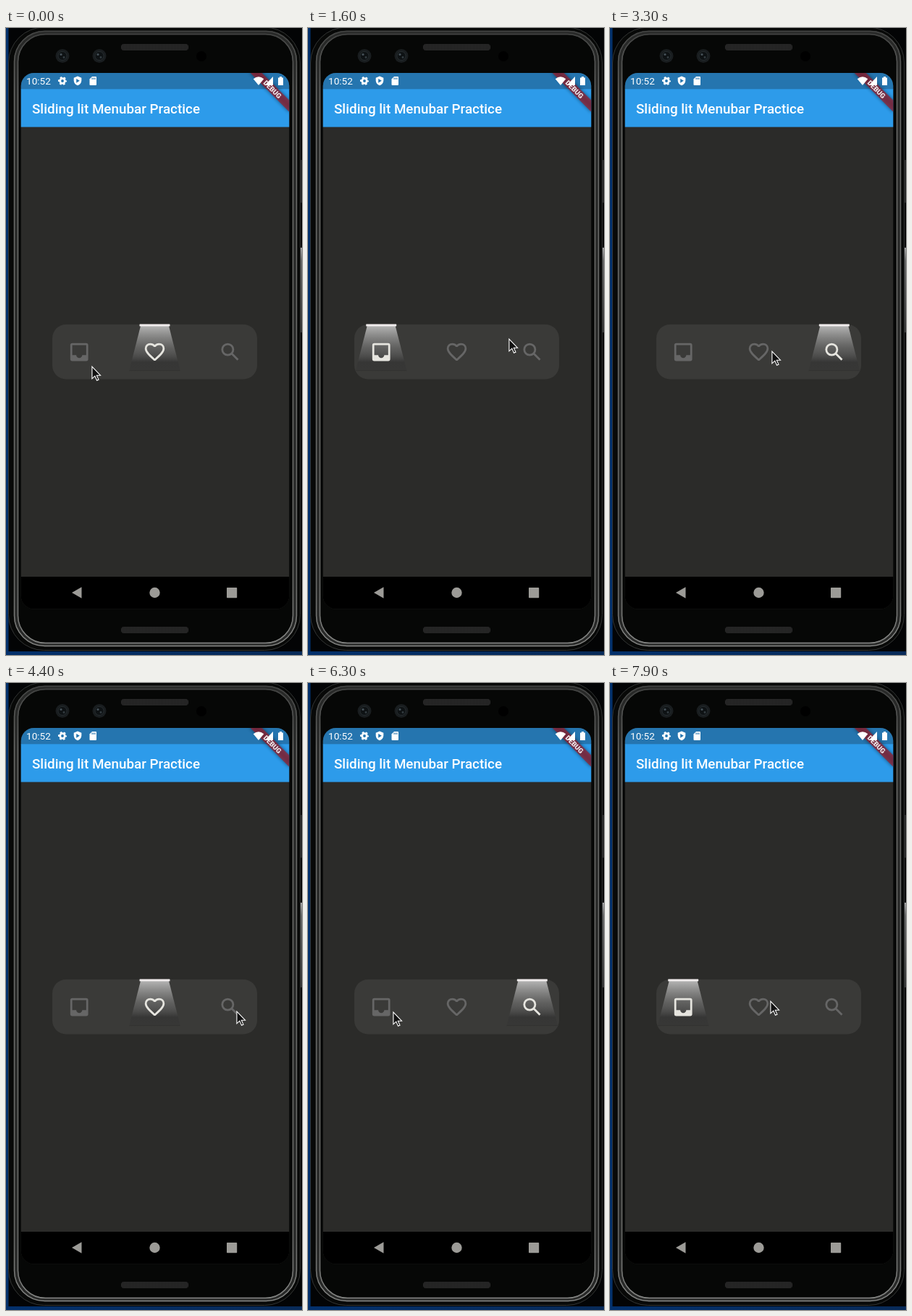
Write an HTML page that moves like this. It is 409 by 865 pixels and loops after 8000 ms.

```html
<!DOCTYPE html>
<html lang="en">
<head>
<meta charset="utf-8">
<title>Spotlight menu</title>
<style>
html, body { margin: 0; width: 100%; height: 100%; overflow: hidden; background: #032f6b; }
svg { display: block; width: 409px; height: 865px; }
text { font-family: Roboto, "Open Sans", sans-serif; fill: #fff; }
</style>
</head>
<body>
<svg viewBox="0 0 409 865">
  <defs>
    <linearGradient id="desk" x1="0" y1="0" x2="1" y2="0">
      <stop offset="0" stop-color="#03306b"/>
      <stop offset="1" stop-color="#082a58"/>
    </linearGradient>
    <linearGradient id="ring" x1="0" y1="0" x2="0" y2="1">
      <stop offset="0" stop-color="#434443"/>
      <stop offset=".1" stop-color="#6c6d6b"/>
      <stop offset=".9" stop-color="#6c6d6b"/>
      <stop offset="1" stop-color="#838482"/>
    </linearGradient>
    <linearGradient id="key" x1="0" y1="0" x2="0" y2="1">
      <stop offset="0" stop-color="#a2a3a3"/>
      <stop offset=".15" stop-color="#636464"/>
      <stop offset="1" stop-color="#333434"/>
    </linearGradient>
    <linearGradient id="glow" x1="0" y1="0" x2="0" y2="1">
      <stop offset="0" stop-color="#fff" stop-opacity=".62"/>
      <stop offset=".5" stop-color="#909090" stop-opacity=".42"/>
      <stop offset=".8" stop-color="#333" stop-opacity=".6"/>
      <stop offset="1" stop-color="#353534" stop-opacity=".5"/>
    </linearGradient>
    <pattern id="mesh" width="2" height="4" patternUnits="userSpaceOnUse">
      <rect width="2" height="4" fill="#2d2d2d"/>
      <rect width="1" height="4" fill="#1c1c1c"/>
    </pattern>
    <clipPath id="screen"><rect x="20.700" y="62" width="370.600" height="739.500" rx="18"/></clipPath>
    <filter id="blur" x="-20%" y="-80%" width="140%" height="260%"><feGaussianBlur stdDeviation="2.5"/></filter>
  </defs>

  <rect width="409" height="865" fill="url(#desk)"/>
  <rect x="3.500" width="405.500" height="860" fill="#030405"/>

  <!-- phone body -->
  <rect x="405.500" y="182" width="5" height="59" rx="2" fill="#252626"/>
  <rect x="405.500" y="303" width="5" height="117" rx="2" fill="url(#key)"/>
  <rect x="3.500" y="-1" width="403" height="859.500" rx="49" fill="#080908" stroke="#333534"/>
  <rect x="14" y="6.500" width="385" height="844" rx="40" fill="#060706" stroke="#282928" stroke-width="6"/>
  <rect x="11.500" y="4.500" width="390" height="848" rx="42" fill="none" stroke="url(#ring)" stroke-width="1.500"/>
  <rect x="16.500" y="8.500" width="380" height="840" rx="38" fill="none" stroke="url(#ring)" stroke-width="1.500"/>
  <rect x="159" y="22" width="93" height="9" rx="4" fill="url(#mesh)"/>
  <rect x="159" y="826" width="93" height="9" rx="4" fill="url(#mesh)"/>
  <g id="lenses"></g>
  <circle cx="270" cy="39" r="7" fill="#000"/>

  <g clip-path="url(#screen)">
    <rect x="20" y="62" width="372" height="740" fill="#2b2b29"/>
    <rect x="20" y="84" width="372" height="52.600" fill="#2d9bea"/>
    <rect x="20" y="62" width="372" height="22.300" fill="#2575af"/>
    <text x="28" y="78" font-size="13.600">10:52</text>
    <text x="36" y="118" font-size="18.840" font-weight="500">Sliding lit Menubar Practice</text>

    <!-- corner ribbon -->
    <g transform="translate(391 62) rotate(45)">
      <rect x="-38" y="26.400" width="76" height="11.300" fill="#000" opacity=".5" filter="url(#blur)"/>
      <rect x="-38" y="26.400" width="76" height="11.300" fill="#981f30" opacity=".72"/>
      <text y="35.500" font-size="9.600" font-weight="900" text-anchor="middle" opacity=".9">DEBUG</text>
    </g>

    <!-- status icons -->
    <g fill="#fff">
      <circle cx="78" cy="73" r="3.300" fill="none" stroke="#fff" stroke-width="2.800"/>
      <circle cx="78" cy="73" r="5" fill="none" stroke="#fff" stroke-width="2" stroke-dasharray="2.600 2.636" stroke-dashoffset="1.300"/>
      <path d="M99 66.500l5.300 2.300v3.600c0 3.200-2.200 5.800-5.300 6.900-3.100-1.100-5.300-3.700-5.300-6.900v-3.600z"/>
      <path d="M97.200 69.900l4.600 2.900-4.600 2.900z" fill="#2575af"/>
      <path d="M119 67h5a1 1 0 0 1 1 1v10a1 1 0 0 1-1 1h-7.500a1 1 0 0 1-1-1v-7.500z"/>
      <path d="M119 68.500v2.500m2-2.500v2.500m2-2.500v2.500" stroke="#2575af"/>
      <path d="M341.700 70.300q7.300-6 14.600 0L349 79z"/>
      <path d="M369 67v12h-11.500z"/>
      <path d="M376 68.500h2v-1.500h3v1.500h2V79h-7z"/>
    </g>

    <rect x="64" y="409" width="283" height="75.500" rx="19" fill="#3a3a38"/>
    <g id="beam">
      <path d="M-19.500 411h39L35.500 473.500h-71z" fill="url(#glow)"/>
      <path d="M-35 472.500h70" stroke="#323231" opacity=".8"/>
      <rect x="-21" y="408.500" width="42" height="3" rx=".5" fill="#f0ecec"/>
    </g>
    <g id="icons" fill="none" stroke-width="2">
      <g>
        <rect x="4" y="4" width="16" height="16" rx="1"/>
        <path d="M4 15h5a3 3 0 0 0 6 0h5v5H4z" fill="currentColor" stroke="none"/>
      </g>
      <path stroke-linejoin="bevel" d="M12 20C6.700 15.200 3 11.900 3 8.500 3 5.900 5 4 7.500 4c1.900 0 3.700 1 4.500 2.500C12.800 5 14.600 4 16.500 4 19 4 21 5.900 21 8.500c0 3.400-3.700 6.700-9 11.500z"/>
      <path d="M15 9.500a5.500 5.500 0 1 0-11 0 5.500 5.500 0 0 0 11 0zM13.600 13.600l6.200 6.200"/>
    </g>

    <rect x="20" y="757" width="372" height="45" fill="#000"/>
    <g fill="#9c9b97">
      <path d="M91 779l13.500-7.700v15.400z"/>
      <circle cx="205.500" cy="779" r="7.200"/>
      <rect x="305" y="772" width="14.200" height="14.200" rx=".8"/>
    </g>
  </g>

  <path id="cursor" d="M.5.500V17.200l3.900-3.700 2.700 6.100 2.500-1.100-2.700-5.900h5.200z" fill="#111" stroke="#fff" stroke-width="1.100"/>
</svg>

<script>
const LOOP = 8000, STEP = 100, GLIDE = 550;
const SLOTS = [101.2, 205.5, 309.8];
const taps = [[820, 0], [2360, 2], [3760, 1], [5360, 2], [6950, 0]]; // time, slot
const pointer = [ // time, x, y
  [200, 118, 466], [300, 112, 457], [500, 104, 444], [1300, 104, 444],
  [1600, 277, 428], [2000, 303, 441], [2900, 303, 441], [3200, 241, 444],
  [3300, 223, 445], [3500, 203, 447], [4100, 203, 447], [4400, 318, 452],
  [4600, 333, 453], [4700, 333, 453], [4800, 333, 450], [5800, 333, 450],
  [6100, 181, 453], [6200, 181, 453], [6300, 117, 453], [6500, 98, 450],
  [7600, 98, 450], [7900, 221, 438]
];

const byId = id => document.getElementById(id);
const clamp = v => Math.min(1, Math.max(0, v));
const mix = (a, b, p) => a + (b - a) * p;
const ease = p => p * p * (3 - 2 * p);
const icons = [...byId('icons').children];

icons.forEach((icon, i) =>
  icon.setAttribute('transform', `translate(${SLOTS[i] - 16.5} 430.5) scale(1.375)`));

byId('lenses').innerHTML = [78, 129].map(x => `
  <circle cx="${x}" cy="38.5" r="9.5" fill="#191d1f"/>
  <circle cx="${x}" cy="38.5" r="6" fill="#0e1214" stroke="#262d30"/>
  <circle cx="${x - 2}" cy="36.5" r="1.6" fill="#465158"/>
  <circle cx="${x + 2}" cy="40.5" r="1.4" fill="#343d42"/>`).join('');

function pointerAt(t) {
  const next = pointer.findIndex(key => key[0] > t);
  if (next === 0) return pointer[0].slice(1);
  if (next < 0) return pointer[pointer.length - 1].slice(1);
  const a = pointer[next - 1], b = pointer[next];
  const p = (t - a[0]) / (b[0] - a[0]);
  return [mix(a[1], b[1], p), mix(a[2], b[2], p)];
}

function slotAt(t) {
  let slot = 1;
  for (const [start, target] of taps) slot = mix(slot, target, ease(clamp((t - start) / GLIDE)));
  return slot;
}

function draw(t) {
  const slot = slotAt(t);
  byId('beam').setAttribute('transform', `translate(${mix(SLOTS[0], SLOTS[2], slot / 2)} 0)`);
  icons.forEach((icon, i) => {
    const lit = clamp(1 - Math.abs(slot - i) * 1.5);
    const tone = [230, 229, 223].map(v => Math.round(mix(102, v, lit)));
    icon.style.color = icon.style.stroke = `rgb(${tone})`;
  });
  const [x, y] = pointerAt(t).map(Math.round);
  byId('cursor').setAttribute('transform', `translate(${x + 0.4} ${y + 0.6})`);
}

const began = performance.now();
function tick() {
  const t = (performance.now() - began) % LOOP;
  draw(Math.floor(t / STEP) * STEP);
  requestAnimationFrame(tick);
}
tick();
</script>
</body>
</html>
```
